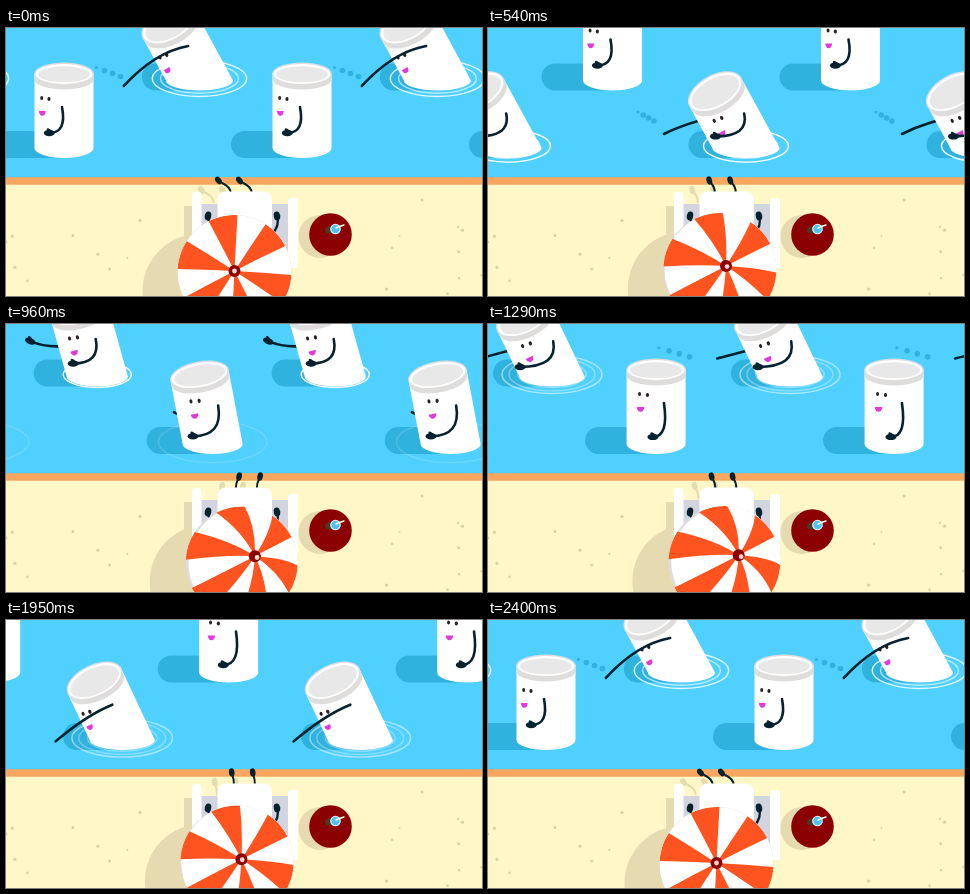
An HTML page with a canvas that plays this animation: 476 px wide and 268 px high, repeating every 2430 ms.

```html
<!DOCTYPE html>
<html lang="en">
<head>
<meta charset="utf-8">
<title>Poolside swimmers</title>
<style>
  html, body { margin: 0; width: 100%; height: 100%; overflow: hidden; background: #50d0ff; }
  canvas { display: block; width: 476px; height: 268px; }
</style>
</head>
<body>
<canvas id="stage" width="476" height="268"></canvas>
<script>
const ctx = document.getElementById('stage').getContext('2d');
const LOOP = 2430, CYCLE = 2400, STROKE = 1200, SPACING = 238, TAU = 2 * Math.PI;
const WATER = '#50d0ff', SHADE = '#2fb2dd', SAND = '#fff7c8', SAND_SHADE = '#e5dab0';
const INK = '#06222e', ORANGE = '#ff5420', MAROON = '#8b0000', RIM = '#dfdcdc';

const lerp = (a, b, u) => a + (b - a) * u;
function smooth(from, to, t) {
  const u = Math.max(0, Math.min(1, (t - from) / (to - from)));
  return u * u * (3 - 2 * u);
}
// Eases from 0 to 1 over a..b, then back to 0 over c..d.
const pulse = (a, b, c, d, t) => smooth(a, b, t) * (1 - smooth(c, d, t));
const wave = (t, period, delay = 0) => Math.cos(TAU * (t - delay) / period);

function oval(x, y, rx, ry, color, turn = 0) {
  ctx.beginPath();
  ctx.ellipse(x, y, rx, ry, turn, 0, TAU);
  ctx.fillStyle = color;
  ctx.fill();
}
const disc = (x, y, r, color) => oval(x, y, r, r, color);

function box(x, y, w, h, color, radius = 0) {
  ctx.beginPath();
  ctx.roundRect(x, y, w, h, radius);
  ctx.fillStyle = color;
  ctx.fill();
}

function curve(x0, y0, cx, cy, x1, y1, width, color) {
  ctx.beginPath();
  ctx.moveTo(x0, y0);
  ctx.quadraticCurveTo(cx, cy, x1, y1);
  ctx.lineWidth = width;
  ctx.lineCap = 'round';
  ctx.strokeStyle = color;
  ctx.stroke();
}

// Each can lunges once per stroke, one arm and then the other.
const leanAt = time => .5 * pulse(264, 540, 624, 1200, time % STROKE);

function armPose(time) {
  const lean = leanAt(time), roll = wave(time, CYCLE);
  const lift = smooth(1450, 1690, time);
  const reach = lift * (1 - smooth(1800, 2260, time));
  const shoulder = { x: 3 - 5 * roll - 10 * reach - 8 * lean, y: -41 + 13 * lean };
  const rest = { x: -21 - 5 * roll - 13 * wave(time, STROKE, 700), y: -11 - 4 * roll };
  return {
    shoulder,
    elbow: { x: lerp(shoulder.x + 5, -46, reach), y: lerp(rest.y, -29, reach) },
    hand: { x: lerp(rest.x, -77, reach), y: lerp(rest.y, 6, reach) - 24 * Math.sin(Math.PI * lift) },
    palm: 1 - pulse(1650, 1740, 2200, 2300, time)
  };
}

function drawArm(time, far) {
  const { shoulder, elbow, hand, palm } = armPose(time % CYCLE);
  if (far) {
    elbow.x -= 6;
    hand.x -= 5;
    hand.y -= 20;
  }
  curve(shoulder.x, shoulder.y, elbow.x, elbow.y, hand.x, hand.y, 2.6, INK);
  if (palm > 0) {
    const turn = Math.atan2(hand.y - elbow.y, hand.x - elbow.x);
    oval(hand.x, hand.y, 5.5 * palm, 3.2 * palm, INK, turn);
    oval(hand.x, hand.y - 2.5 * palm, 3 * palm, 1.5 * palm, INK, turn + .6);
  }
}

function drawRings(phase) {
  const fade = (1 - .85 * smooth(540, 900, phase)) * (1 - smooth(1080, 1200, phase));
  for (let i = 0; i < 3; i++) {
    const age = phase - 385 - 120 * i;
    if (age <= 0) continue;
    const r = 58 - 26 * Math.exp(-age / 300) - 3 * i;
    ctx.globalAlpha = i ? fade * .75 * (1 - smooth(700, 950, phase)) : fade;
    ctx.beginPath();
    ctx.ellipse(0, -2, r, r * .38, 0, 0, TAU);
    ctx.lineWidth = 1.4;
    ctx.strokeStyle = '#fff';
    ctx.stroke();
  }
  ctx.globalAlpha = 1;
}

function drawDrops(time, phase) {
  if (phase < 500 || phase > 742) return;
  const u = (phase - 540) / 190, second = time >= STROKE;
  const x = second ? -91 : -100 - 15 * u;
  const y = second ? -8 : -31 + 7 * u;
  const gap = (16 + 14 * u) / 3;
  for (let i = 0; i < 4; i++) {
    disc(x + (i - 1.5) * gap, y - 5 + 3 * i, i ? 2.8 : 1.6, SHADE);
  }
}

function drawCan(lean) {
  const length = 74 - 20 * lean, half = 29.5 / Math.cos(lean);
  const sin = Math.sin(lean), cos = Math.cos(lean);
  const lidX = -sin * length, lidY = -cos * length, ry = 10 + 11 * lean;
  ctx.beginPath();
  ctx.moveTo(lidX - 29.5 * cos, lidY + 29.5 * sin);
  ctx.lineTo(-half, 0);
  ctx.ellipse(0, 0, half, 10, 0, Math.PI, 0, true);
  ctx.lineTo(lidX + 29.5 * cos, lidY - 29.5 * sin);
  ctx.fillStyle = '#fff';
  ctx.fill();
  ctx.save();
  ctx.translate(lidX, lidY);
  ctx.rotate(-lean);
  oval(0, 5.5, 29.5, ry, RIM);
  oval(0, 0, 29.8, ry + 1.5, RIM);
  oval(0, 0, 28.5, ry, '#fff');
  oval(0, .3, 26, ry - 2, '#e8e8e8');
  ctx.restore();
}

function drawFace(time, lean) {
  const x = -17 + 6 * wave(time, CYCLE, 850), sink = 22 * lean;
  const squeeze = Math.sqrt(1 - (x / 31) ** 2), gap = 2 + 2.2 * squeeze;
  ctx.save();
  ctx.rotate(-lean);
  oval(x + 2 - gap, -50 + sink, 1.5, 2.1, '#2b2020');
  oval(x + 2 + gap, -49 + sink, 1.6, 2.1, '#2b2020');
  ctx.beginPath();
  ctx.ellipse(x - 1, -37 + sink, 1.5 + 2.5 * squeeze, 4.8, 0, 0, Math.PI);
  ctx.fillStyle = '#e03bd8';
  ctx.fill();
  ctx.restore();
}

function drawSwimmer(time, x, y) {
  const phase = time % STROKE, lean = leanAt(time);
  const left = -71 + 27 * lean;
  ctx.save();
  ctx.translate(x, y);
  box(left, -17, 15 - left, 27, SHADE, 13.5);
  drawRings(phase);
  drawDrops(time, phase);
  drawArm(time + STROKE, true);
  drawCan(lean);
  drawFace(time, lean);
  drawArm(time, false);
  ctx.restore();
}

function drawRow(clock, right, y) {
  const time = clock % CYCLE;
  const x = right - SPACING * time / CYCLE + 31 * leanAt(time);
  for (let k = -2; k <= 2; k++) drawSwimmer(time, x + k * SPACING, y);
}

function drawBeach() {
  box(0, 149.3, 476, 8, '#f9a75f');
  box(0, 156.7, 476, 112, SAND);
  let seed = 11;
  const random = () => (seed = seed * 16807 % 2147483647) / 2147483647;
  for (let i = 0; i < 24; i++) {
    disc(random() * 476, 172 + random() * 94, 1 + random() * .8, '#ddd0a0');
  }
}

function drawFeet(time, dx, dy, color) {
  const foot = 222 - 7 * wave(time, CYCLE) - 7 * wave(time, STROKE, 230);
  const hip = 227 + .25 * (foot - 222);
  for (const gap of [0, 21]) {
    const fx = foot + gap + dx, hx = hip + gap + dx;
    curve(hx, 165 + dy, hx, 159 + dy, lerp(fx, hx, .3), 155 + dy, 2, color);
    oval(fx, 152.5 + dy, 2.8, 4.2, color, (fx - hx) / 18);
  }
}

function drawLounger(time, shadeX, shadeY) {
  disc(shadeX, shadeY, 57, SAND_SHADE);
  box(178, 178, 12, 60, SAND_SHADE);
  drawFeet(time, -17, 9.5, SAND_SHADE);
  box(193, 176, 90, 60, '#d2d5df');
  box(186, 164, 9.5, 76, '#fff', [3, 3, 0, 0]);
  box(282, 170, 10, 70, '#fff', [3, 3, 0, 0]);
  drawFeet(time, 0, 0, INK);
  box(211.5, 163.5, 54.5, 70, '#fff', [8, 8, 0, 0]);
  curve(202, 188, 203, 198, 211, 206, 2.3, INK);
  curve(271, 188, 274, 198, 266, 206, 2.3, INK);
  oval(202, 188, 3.2, 4.5, INK, .2);
  oval(271, 188, 3.2, 4.5, INK, -.2);
}

function drawTable() {
  disc(314, 208.5, 21.5, SAND_SHADE);
  disc(324.5, 206.5, 21.3, MAROON);
  oval(323, 202, 4, 3.5, '#4b3b25');
  disc(329.5, 201, 5.3, '#e8f8ff');
  disc(329.5, 201, 4.2, '#4fc3ee');
  curve(330, 200, 334, 198, 338, 197, 1.4, '#fff');
}

// The spokes bow with the dome as its hub tips away from the centre.
function drawUmbrella(x, y, hubX, hubY, sway) {
  const r = 57 - sway, step = TAU / 12;
  disc(x, y, r, RIM);
  ctx.save();
  ctx.beginPath();
  ctx.arc(x, y, r, 0, TAU);
  ctx.clip();
  disc(x + 3 * sway, y, r, '#fff');
  for (let k = 0; k < 6; k++) {
    const from = (-117 + 60 * k) * TAU / 360, to = from + step;
    const bow = a => [hubX + r / 2 * Math.cos(a), hubY + r / 2 * Math.sin(a)];
    ctx.beginPath();
    ctx.moveTo(hubX, hubY);
    ctx.quadraticCurveTo(...bow(from), x + r * Math.cos(from), y + r * Math.sin(from));
    ctx.arc(x, y, r, from, to);
    ctx.quadraticCurveTo(...bow(to), hubX, hubY);
    ctx.fillStyle = ORANGE;
    ctx.fill();
  }
  ctx.restore();
  disc(hubX, hubY, 6, MAROON);
  disc(hubX + 2.5 * sway, hubY + 1.5 * sway, 2.4, '#ffd9cc');
}

function draw(time) {
  ctx.fillStyle = WATER;
  ctx.fillRect(0, 0, 476, 268);
  drawRow(time + 1850, 361.5, 52.5);
  drawRow(time, 296, 120);
  drawBeach();
  const sway = (1 - wave(time, CYCLE)) / 2;
  const x = 228.5 + 8 * sway, y = 244 - 6 * sway;
  drawLounger(time, x - 35, y + 19);
  drawTable();
  drawUmbrella(x, y, 228.5 + 22.5 * sway, 243 - 12 * sway, sway);
}

let start;
function tick(now) {
  start ??= now;
  draw(Math.floor(((now - start) % LOOP) / 30) * 30);
  requestAnimationFrame(tick);
}
draw(0);
requestAnimationFrame(tick);
</script>
</body>
</html>
```
